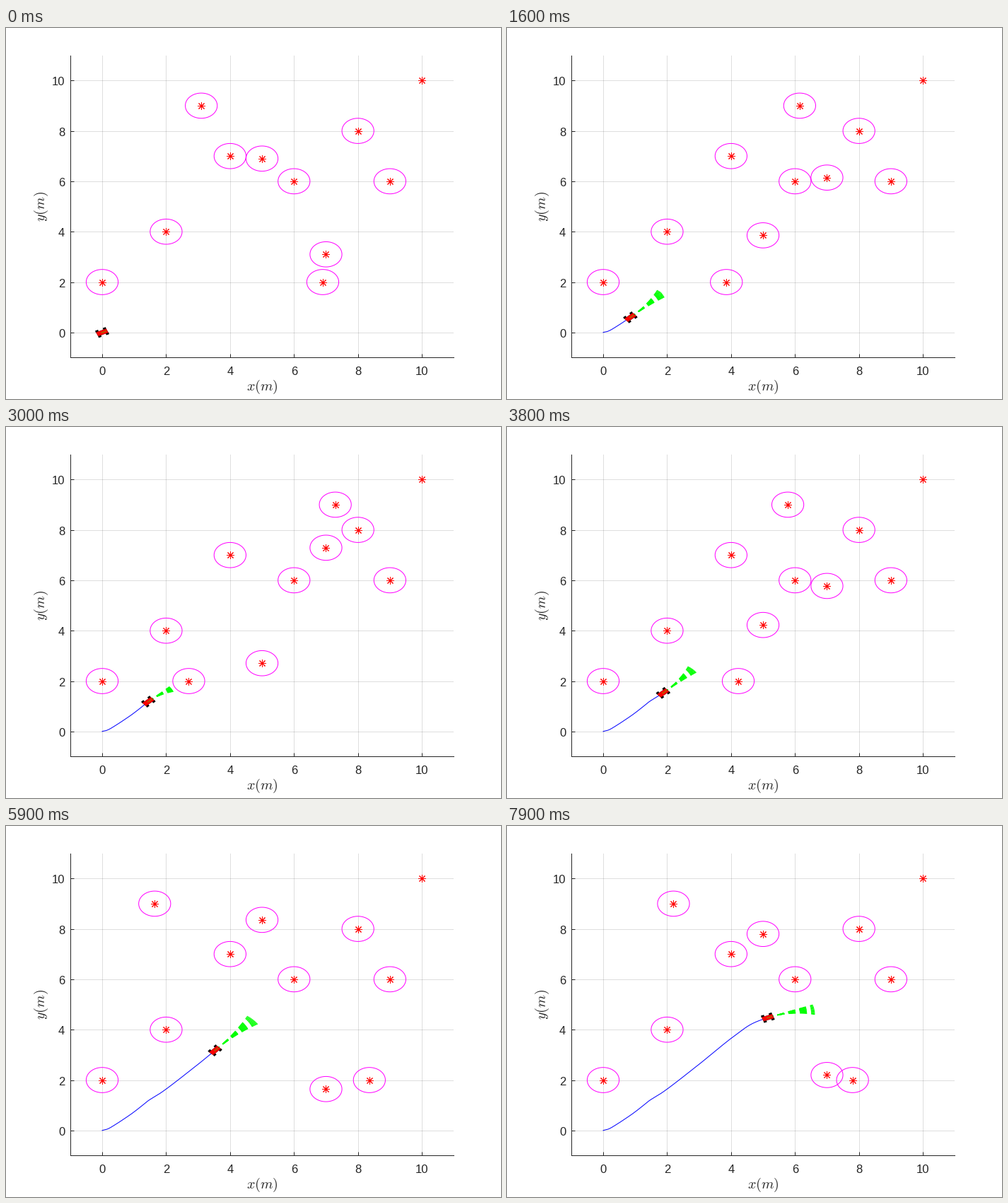
A matplotlib script for the animation above (8 s loop, 700 px wide and 525 px high).

```python
import numpy as np
import matplotlib.pyplot as plt
from matplotlib.animation import FuncAnimation
from matplotlib.collections import LineCollection
from matplotlib.patches import Polygon
from matplotlib.transforms import ScaledTranslation

FRAMES, STEP = 80, 100
PX = 0.72  # one pixel in points at 100 dpi
INK = "#262626"

plt.rcParams["font.family"] = "Liberation Sans"
plt.rcParams["mathtext.fontset"] = "cm"

fig = plt.figure(figsize=(7, 5.25), dpi=100, facecolor="white")
ax = fig.add_axes([90.8 / 700, 58.52 / 525, 0.775, 0.815])
ax.set(xlim=(-1, 11), ylim=(-1, 11), xticks=range(0, 11, 2), yticks=range(0, 11, 2))
ax.set_axisbelow(True)
ax.grid(color=INK, alpha=0.15, lw=PX)
ax.tick_params(direction="in", length=5.4 * PX, width=PX, color=INK,
               labelcolor=INK, labelsize=12)
ax.tick_params(axis="x", pad=12.5 * PX)
ax.tick_params(axis="y", pad=7.5 * PX)
for text in ax.get_yticklabels():
    text.set_transform(text.get_transform() + ScaledTranslation(0, -0.01, fig.dpi_scale_trans))
for side in ("top", "right"):
    ax.spines[side].set_visible(False)
for side in ("left", "bottom"):
    ax.spines[side].set(color=INK, linewidth=PX)
label = dict(fontsize=14.4, color=INK, ha="center", va="center")
fig.text(362.5 / 700, 1 - 507.5 / 525, "$x(m)$", **label)
fig.text(49.5 / 700, 1 - 253 / 525, "$y(m)$", rotation=90, **label)


def hermite(keys, values, t):
    """Smooth curve through the keyed values."""
    keys, values = np.asarray(keys, float), np.asarray(values, float)
    slope = np.gradient(values, keys)
    i = np.clip(np.searchsorted(keys, t, side="right") - 1, 0, len(keys) - 2)
    h = keys[i + 1] - keys[i]
    u = (t - keys[i]) / h
    return ((1 + 2 * u) * (1 - u) ** 2 * values[i] + u * (1 - u) ** 2 * h * slope[i]
            + u * u * (3 - 2 * u) * values[i + 1] + u * u * (u - 1) * h * slope[i + 1])


# Way points (frame, x, y); heading and speed follow from the path
WAY = [(0, 0, 0), (9, .28, .13), (16, .85, .6), (23, 1.21, .945), (30, 1.445, 1.185),
       (38, 1.876, 1.53), (51, 2.915, 2.54), (67, 4.145, 3.79), (73, 4.62, 4.21),
       (79, 5.15, 4.475), (85, 5.7, 4.63)]
SUB = 4
frame, way_x, way_y = zip(*WAY)
time = np.arange(frame[-1] * SUB + 1) / SUB
path = np.column_stack([hermite(frame, way_x, time), hermite(frame, way_y, time)])
velocity = np.gradient(path, time, axis=0)
heading = np.arctan2(velocity[:, 1], velocity[:, 0])
speed = np.hypot(*velocity.T)

# Shared coordinate of the moving obstacles, bouncing between two walls
SLIDE = ([0, 26, 38, 67.5, 79], [3.1, 8.05, 5.775, -0.03, 2.2])
FIXED = [(0, 2), (2, 4), (4, 7), (6, 6), (8, 8), (9, 6)]
GOAL = (10, 10)

angle = np.linspace(0, 2 * np.pi, 80)
ring = 0.5 * np.column_stack([np.cos(angle), np.sin(angle)])


def segments(color, width, z, **style):
    return ax.add_collection(LineCollection([], colors=color, linewidths=width * PX,
                                            zorder=z, **style))


rings = segments("magenta", 1, 3)
stars, = ax.plot([], [], ls="", marker=(8, 2, 0), ms=11 * PX, mec="red", mew=PX,
                 antialiased=False, zorder=4)
trail, = ax.plot([], [], color="blue", lw=PX, zorder=5)
fan = segments("lime", 1, 6, linestyles=[(2, (10, 6))], capstyle="butt")
wheels = segments("black", 3, 7, capstyle="butt")
body = ax.add_patch(Polygon(np.zeros((4, 2)), fc="red", ec="#b00000", lw=0.8 * PX, zorder=8))
spine, = ax.plot([], [], color="#9a7a00", lw=1.3 * PX, zorder=9)


def place(points, origin, phi):
    c, s = np.cos(phi), np.sin(phi)
    return np.asarray(points) @ np.array([[c, s], [-s, c]]) + origin


def arcs(i):
    """Candidate paths: arcs around the current turn, as long as the speed allows."""
    reach = 15.5 * speed[i]
    turn = 1.5 * (heading[i + 3 * SUB] - heading[max(i - 3 * SUB, 0)])
    u = np.linspace(0, 1, 25)[:, None]
    lines = []
    for k in turn + np.radians(np.linspace(-15, 15, 17)) + 1e-6:
        local = np.hstack([np.sin(k * u), 1 - np.cos(k * u)]) * reach / k
        lines.append(place(local, path[i], heading[i]))
    return lines


def draw(n):
    p = np.interp(n, *SLIDE)
    spots = FIXED + [(p, 9), (5, 10 - p), (10 - p, 2), (7, p)]
    rings.set_segments([ring + s for s in spots])
    stars.set_data(*zip(*spots, GOAL))

    i = n * SUB
    pose = path[i], heading[i]
    trail.set_data(*path[:i + 1].T)
    fan.set_segments(arcs(i) if n else [])

    body.set_xy(place([(-.17, -.08), (.17, -.08), (.17, .08), (-.17, .08)], *pose))
    wheels.set_segments([place([(a - .05, b), (a + .05, b)], *pose)
                         for a in (-.13, .13) for b in (-.11, .11)])
    spine.set_data(*place([(-.02, 0), (.13, 0)], *pose).T)
    return rings, stars, trail, fan, wheels, body, spine


anim = FuncAnimation(fig, draw, frames=FRAMES, interval=STEP, repeat=True,
                     repeat_delay=0, init_func=lambda: draw(0), blit=False)
plt.show()
```
